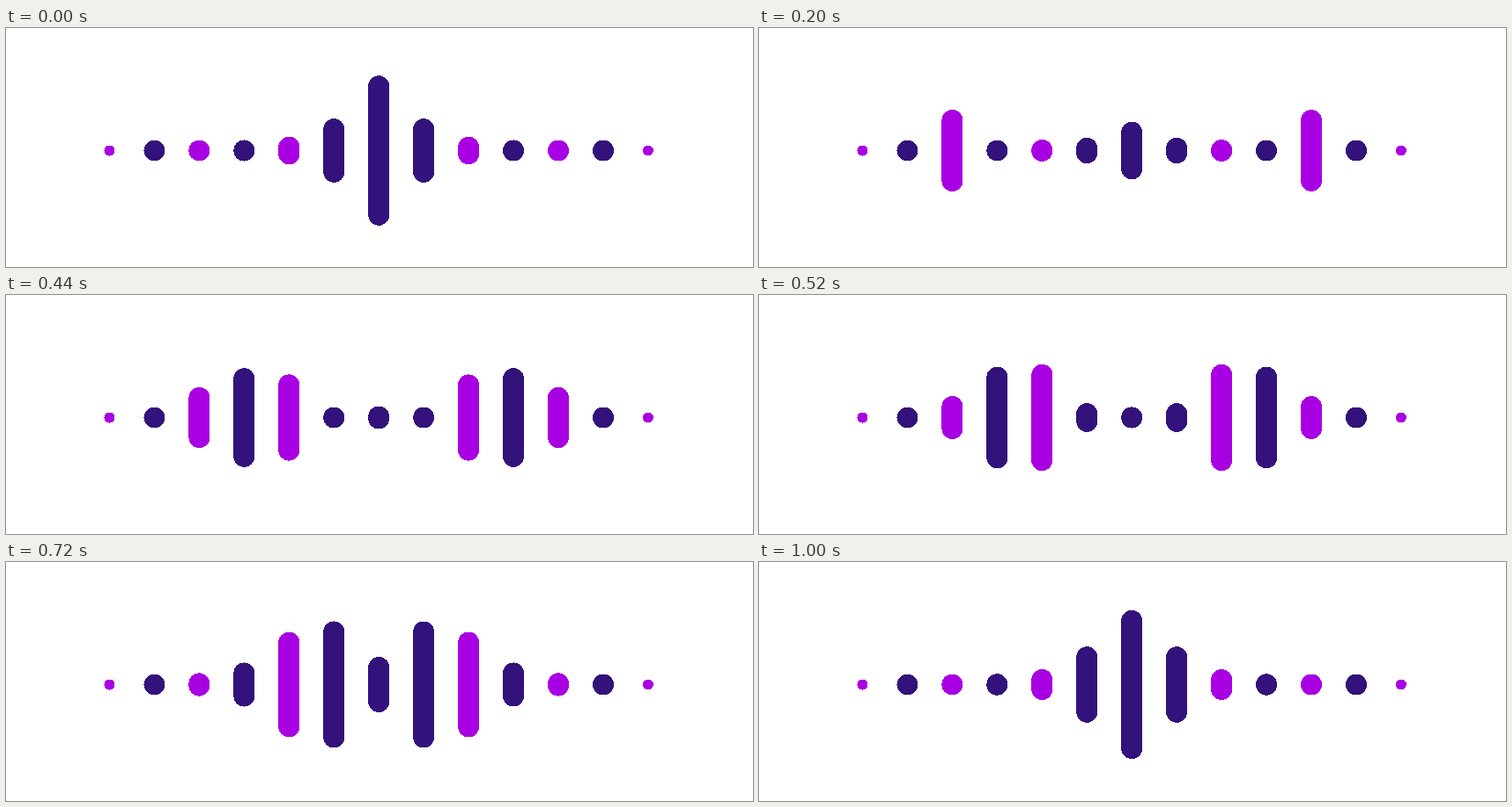
Recreate the animation shown at these times as an HTML page. Size 848 px wide and 272 px high, loop 2000 ms.

```html
<!DOCTYPE html>
<html lang="en">
<head>
<meta charset="utf-8">
<title>Sound wave</title>
<style>
  html, body { margin: 0; width: 100%; height: 100%; overflow: hidden; background: #fff; }
  svg { display: block; width: 848px; height: 272px; }
</style>
</head>
<body>
<svg viewBox="0 0 848 272" shape-rendering="crispEdges"></svg>
<script>
const LOOP = 2000, STEP = 40, CYCLE = 26;
const CENTER_X = 423.2, CENTER_Y = 139.5, SPACING = 50.95, WIDTH = 24;
const DARK = '#33127b', PURPLE = '#a900e3';

// Ordered from the middle outwards; times are in steps of 40 ms.
const bars = [
  { color: DARK,   gain: 148.5, rise: 17.39, fall: 26.1,  span: 14.3, power: 3 },
  { color: DARK,   gain: 130,   rise: 12.86, fall: 21.32, span: 12.2, power: 2 },
  { color: PURPLE, gain: 111,   rise: 8.79,  fall: 17.5,  span: 30,   power: 8 },
  { color: DARK,   gain: 93.5,  rise: 5.1,   fall: 13.1,  span: 14.3, power: 3 },
  { color: PURPLE, gain: 75.2,  rise: 0,     fall: 9,     span: 13.1, power: 3 },
  { color: DARK },
  { color: PURPLE, size: 12 }
];

const svg = document.querySelector('svg');

function addPill(x, color, size) {
  const pill = document.createElementNS(svg.namespaceURI, 'rect');
  const attributes = {
    x: x - size / 2, y: CENTER_Y - size / 2,
    width: size, height: size, rx: size / 2, fill: color
  };
  for (const name in attributes) pill.setAttribute(name, attributes[name]);
  svg.append(pill);
  return pill;
}

bars.forEach((bar, i) => {
  const sides = i ? [-1, 1] : [0];
  bar.pills = sides.map(side =>
    addPill(CENTER_X + side * i * SPACING, bar.color, bar.size || WIDTH));
});

// Exponential rise, then a power ease-out back to a dot.
function barHeight({ gain, rise, fall, span, power }, step) {
  const time = step < rise ? step + CYCLE : step;
  const raised = 1 - Math.exp(-0.5 * (Math.min(time, fall) - rise));
  const left = Math.min(1, Math.max(0, 1 - (time - fall) / span));
  return WIDTH + gain * raised * left ** power;
}

function draw(now) {
  const step = Math.min(Math.floor(now % LOOP / STEP), CYCLE - 1);
  for (const bar of bars) {
    if (!bar.gain) continue;
    const height = barHeight(bar, step);
    for (const pill of bar.pills) {
      pill.setAttribute('y', CENTER_Y - height / 2);
      pill.setAttribute('height', height);
    }
  }
}

const start = performance.now();
function tick() {
  draw(performance.now() - start);
  requestAnimationFrame(tick);
}
tick();
</script>
</body>
</html>
```
